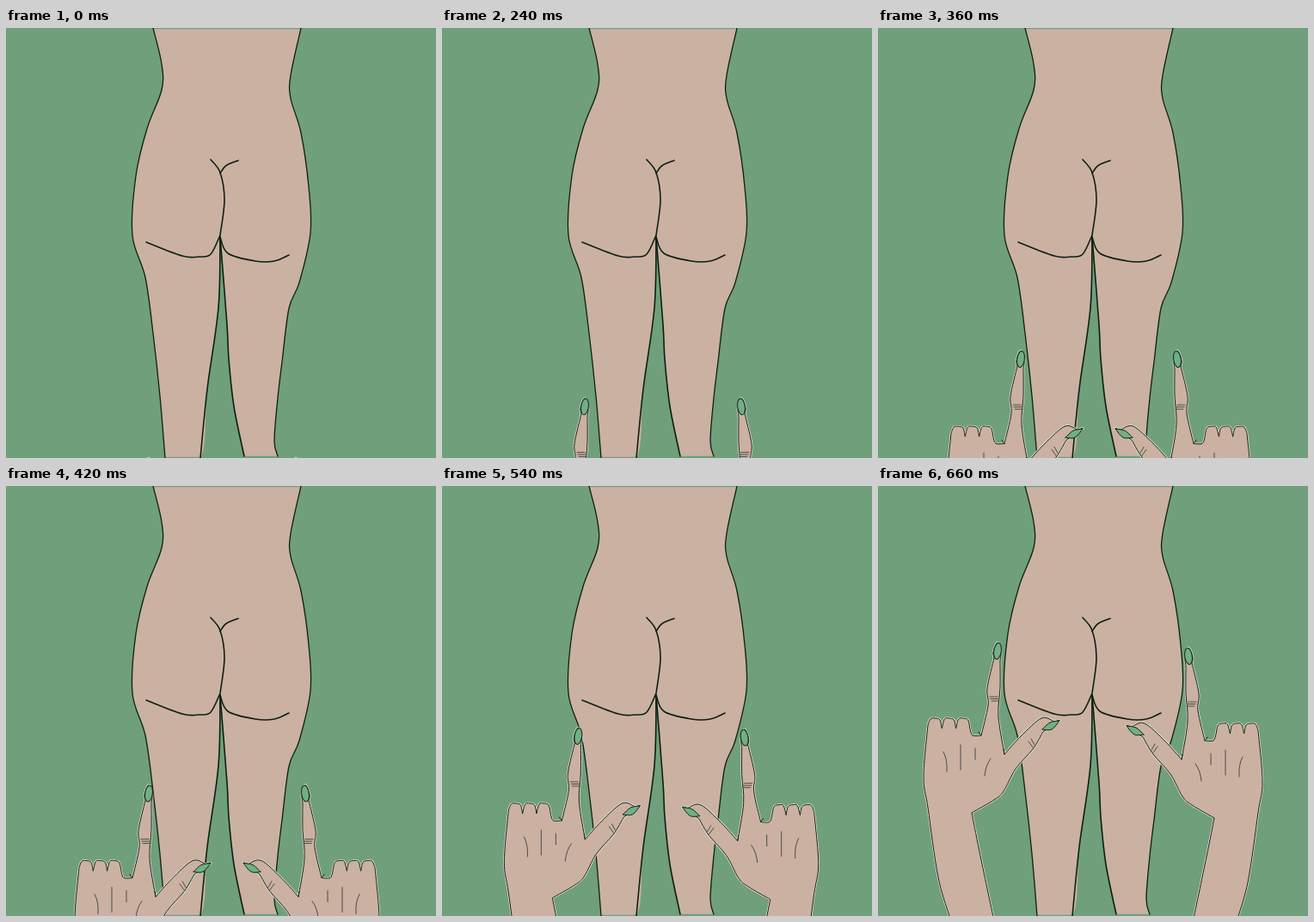
Animation, 500 px wide and 500 px high, one loop 0.79 s. Source, as an HTML page:

```html
<!DOCTYPE html>
<html lang="en">
<head>
<meta charset="utf-8">
<title>Framing hands</title>
<style>
html, body { margin: 0; width: 100%; height: 100%; overflow: hidden; background: #709f7b; }
svg { display: block; width: 100vw; height: 100vh; }
path, ellipse { fill: none; stroke-linecap: round; stroke-linejoin: round; }
.skin { fill: #cbb1a1; }
.line { stroke: #0c2015; stroke-width: 1.3; }
.fold { stroke: #0c2015; stroke-width: 1.6; }
.trim { stroke: #709f7b; stroke-width: 1.5; }
.halo { stroke: #dfe5dc; stroke-width: 2.5; }
.edge { stroke: #1a2019; stroke-width: 1; }
.crease { stroke: #37433f; stroke-width: .9; }
.nail { fill: #6fb084; stroke: #14251a; stroke-width: 1; }
</style>
</head>
<body>
<svg id="stage" viewBox="0 0 500 500"></svg>
<script>
const DURATION = 790, TICK = 30, LIFT = 480, REST = 660;
const stage = document.getElementById('stage');

function add(parent, tag, attrs = {}) {
  const el = document.createElementNS('http://www.w3.org/2000/svg', tag);
  for (const key in attrs) el.setAttribute(key, attrs[key]);
  return parent.appendChild(el);
}

// Smooth curve through "x,y" points; "|" starts a new run with a corner.
function curve(text) {
  let d = '', last = null;
  for (const run of text.split('|')) {
    const p = run.trim().split(/\s+/).map(s => s.split(',').map(Number));
    if (last) p.unshift(last);
    else d = 'M' + p[0];
    for (let i = 0; i < p.length - 1; i++) {
      const a = p[i - 1] || p[i], b = p[i], c = p[i + 1], e = p[i + 2] || c;
      const near = [0, 1].map(k => b[k] + (c[k] - a[k]) / 6);
      const far = [0, 1].map(k => c[k] - (e[k] - b[k]) / 6);
      d += `C${near} ${far} ${c}`;
    }
    last = p[p.length - 1];
  }
  return d;
}

const draw = (parent, cls, d) => add(parent, 'path', { class: cls, d });
const reverse = text => text.split(' ').reverse().join(' ');

function drawBody() {
  const left = '171,0 181,42 181,72 164,117 151,172 147,241 162,290 171,355 179,428 185,500';
  const right = '343,0 331,55 331,82 343,122 352,185 354,238 341,296 329,326 321,388 316,430 312,480 316,498';
  const innerLeft = '249,243 247,325 234,420 226,500';
  const innerRight = '249,243 257,345 259,385 265,440 277,498';
  const cleft = '238,153 249,168 254,200 249,241|238,263 225,266 205,265 163,249';
  const underfold = '249,243 258,262 290,271 312,271 329,264';
  const branch = '249,169 256,160 270,154';

  draw(stage, 'skin', curve([left, reverse(innerLeft), innerRight, '316,498', reverse(right)].join('|')) + 'Z');
  draw(stage, 'trim', 'M171 .5H343M185 499.5H226M277 498.5H316');
  for (const side of [left, right]) draw(stage, 'line', curve(side));
  for (const fold of [innerLeft, innerRight, cleft, underfold, branch]) draw(stage, 'fold', curve(fold));
}

function handOutline() {
  const runs = ['85,506 70,455 58,374 53,338 58,278'];
  for (let i = 0; i < 3; i++) {
    const x = 58 + 16.3 * i;
    runs.push(`${x + 3},271 ${x + 8},270 ${x + 14},272 ${x + 16.3},282`);
  }
  runs.push(
    '110,290 120,290',
    '128,255 127,235 135,200',
    '134,193 139,182 143,194 142,203',
    '142,235 140,268 147,312',
    '166,291 190,270 205,274',
    '211,273 192,286',
    '180,306 160,329 146,355 135,365 109,380',
    '118,425 135,506'
  );
  return curve(runs.join('|'));
}

function makeHand(place) {
  const mover = add(stage, 'g');
  const hand = add(mover, 'g', { transform: place });
  const outline = handOutline();
  draw(hand, 'halo', outline);
  draw(hand, 'skin', outline + 'Z');
  draw(hand, 'edge', outline);
  add(hand, 'ellipse', { class: 'nail', rx: 4.3, ry: 9.5, transform: 'translate(139 192) rotate(8)' });
  draw(hand, 'nail', curve('191,283 200,275 211,273|202,283 191,283'));
  for (let i = 0; i < 3; i++) draw(hand, 'crease', `M${130 + i} ${245 + 2.5 * i}h9`);
  draw(hand, 'crease', 'M175 297l5 7M178 294l4 7M96 301v29M113 305v13');
  draw(hand, 'crease', 'M76 309q5 9 4 23M131 317q-6 8-7 20');
  draw(hand, 'edge', 'M146 306l1 6M117 286l3 4');
  return mover;
}

drawBody();
const leftHand = makeHand('');
const rightHand = makeHand('translate(500 0) scale(-1 1)');

// The hands rise together, speed up halfway, then lift apart.
function pose(now) {
  const t = Math.min(REST, Math.floor(now % DURATION / TICK) * TICK);
  const lift = Math.max(0, (t - LIFT) / (REST - LIFT)) ** 1.15;
  const rise = Math.min(t, LIFT);
  const y = (318 - .29 * rise - .17 * Math.max(0, rise - 240)) * (1 - lift);
  const drift = 11 * Math.max(0, 1 - t / 240) ** 1.5;
  leftHand.setAttribute('transform', `translate(${27 * (1 - lift)} ${y})`);
  rightHand.setAttribute('transform', `translate(${-13 * (1 - lift) - drift} ${y + 6 * lift})`);
}

const start = performance.now();
function frame() {
  pose(performance.now() - start);
  requestAnimationFrame(frame);
}
frame();
</script>
</body>
</html>
```
